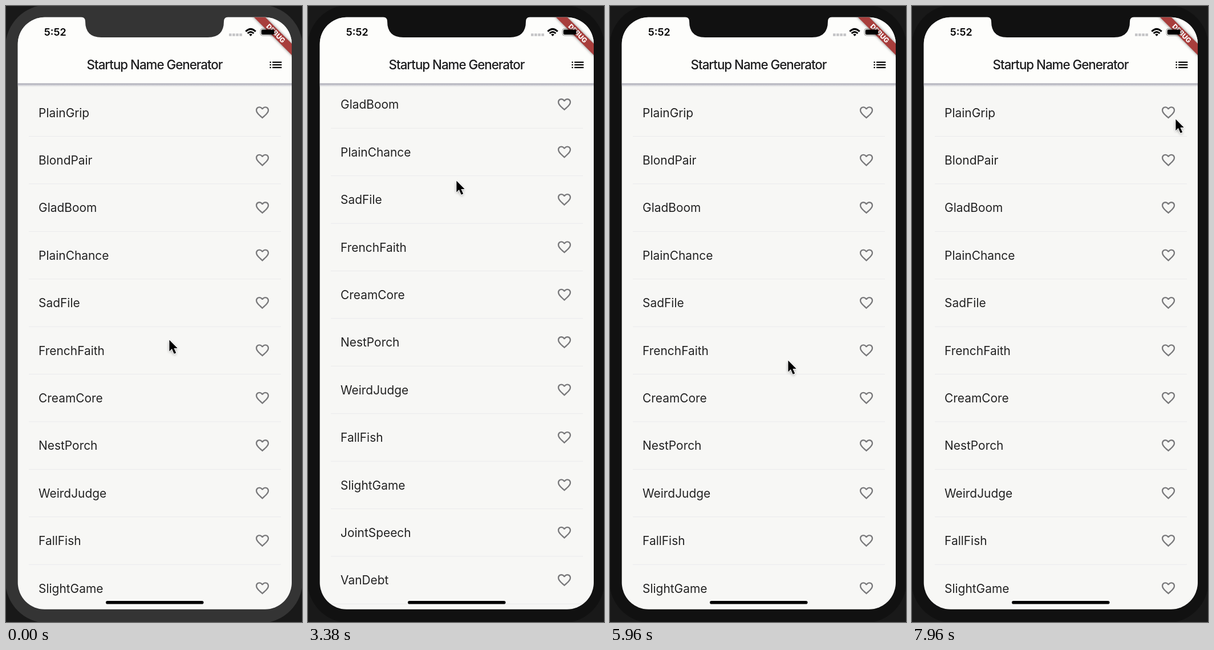
Write an HTML page that moves like this. It is 519x1080 px and loops after 8 s.

```html
<!DOCTYPE html>
<html lang="en">
<head>
<meta charset="utf-8">
<title>Name list</title>
<style>
  html, body { margin: 0; width: 100%; height: 100%; overflow: hidden; background: #191919; }
  svg { display: block; width: 100vw; height: 100vh; }
  text { font-family: Inter, Roboto, sans-serif; font-optical-sizing: none; }
</style>
</head>
<body>
<svg viewBox="0 0 519 1080">
  <defs>
    <clipPath id="screen"><rect x="20.7" y="19.8" width="480.3" height="1038" rx="47"/></clipPath>
    <linearGradient id="shade" x2="0" y2="1">
      <stop offset="0" stop-color="#a4a4ae"/>
      <stop offset=".4" stop-color="#c4c4cc"/>
      <stop offset="1" stop-color="#f7f7f5" stop-opacity="0"/>
    </linearGradient>
    <filter id="soft" x="-50%" y="-50%" width="200%" height="200%"><feGaussianBlur stdDeviation="2.5"/></filter>
    <path id="heart" transform="scale(1.159)" fill="#79797b" d="M16.5 3c-1.74 0-3.41.81-4.5 2.09C10.91 3.81 9.24 3 7.5 3 4.42 3 2 5.42 2 8.5c0 3.78 3.4 6.86 8.55 11.54L12 21.35l1.45-1.32C18.6 15.36 22 12.28 22 8.5 22 5.42 19.58 3 16.5 3zm-4.4 15.55l-.1.1-.1-.1C7.14 14.24 4 11.39 4 8.5 4 6.5 5.5 5 7.5 5c1.54 0 3.04.99 3.57 2.36h1.87C13.46 5.99 14.96 5 16.5 5c2 0 3.5 1.5 3.5 3.5 0 2.89-3.14 5.74-7.9 10.05z"/>
    <path id="arrow" d="M.4 .4V20.4L4.9 16.1L8.7 24.8L12.2 23.3L8.4 14.9H14.7Z"/>
  </defs>

  <rect id="body" x="-1" y="-2" width="521" height="1084" rx="74"/>
  <g clip-path="url(#screen)">
    <rect width="519" height="1080" fill="#f7f7f5"/>
    <g id="list"></g>
    <rect x="20" y="135" width="482" height="8" fill="url(#shade)"/>
    <rect x="20" y="19" width="482" height="116.5" fill="#fdfdfb"/>
    <text x="141.6" y="111.3" font-size="22.3" font-weight="500" letter-spacing="-1" fill="#1c1c1e">Startup Name Generator</text>
    <path transform="translate(459 89.3) scale(1.159)" d="M3 13h2v-2H3zm0 4h2v-2H3zm0-8h2V7H3zm4 4h14v-2H7zm0 4h14v-2H7zM7 7v2h14V7z"/>
    <g transform="translate(473 48) rotate(45)">
      <rect x="-70" y="-7" width="140" height="14" filter="url(#soft)" opacity=".5"/>
      <rect x="-70" y="-7" width="140" height="14" fill="#a83e3c"/>
      <text y="4.2" font-size="11.8" font-weight="800" text-anchor="middle" fill="#fff">DEBUG</text>
    </g>
  </g>
  <path id="notch" d="M132 19Q139 20 139 27Q139 55 167 55H354Q382 55 382 27Q382 20 389 19Z"/>

  <text x="66.8" y="52.4" font-size="17.9" font-weight="600">5:52</text>
  <path d="M391 50.5H414" stroke="#c4c4c6" stroke-width="4.4" stroke-dasharray="4.6 1.5"/>
  <g fill="none" stroke="#000" stroke-width="2.9">
    <path d="M420.3 44.6Q429 36.2 437.7 44.6M423.6 48Q429 43.2 434.4 48"/>
    <path d="M426.2 49.9Q429 47.8 431.8 49.9L429 52.9Z" fill="#000" stroke="none"/>
  </g>
  <rect x="446" y="39.5" width="26" height="12.5" rx="3.8" fill="none" stroke="#000" stroke-opacity=".4"/>
  <rect x="447.7" y="41.2" width="22.6" height="9.1" rx="2.2"/>
  <path d="M473.6 43.7q2 2 0 4.2z" opacity=".45"/>
  <rect x="175" y="1042.9" width="171.5" height="5.6" rx="2.8"/>

  <g id="cursor">
    <use href="#arrow" y="2" filter="url(#soft)" opacity=".45"/>
    <use href="#arrow" stroke="#fff" stroke-width="2" stroke-linejoin="round"/>
    <use href="#arrow"/>
  </g>
</svg>
<script>
const $ = id => document.getElementById(id);
const LOOP = 8000, PITCH = 83.4;
const names = ['PlainGrip', 'BlondPair', 'GladBoom', 'PlainChance', 'SadFile', 'FrenchFaith', 'CreamCore',
  'NestPorch', 'WeirdJudge', 'FallFish', 'SlightGame', 'JointSpeech', 'VanDebt'];

$('list').innerHTML = names.map((name, i) => `<g transform="translate(0 ${i * PITCH})">
  <text x="57.1" y="194.6" font-size="20.9" fill="#222">${name}</text>
  <use href="#heart" x="435.6" y="172.8"/>
  <path d="M40 228.5H482" stroke="#eaeaec"/></g>`).join('');

// Pointer path: time, x, y
const path = [[0, 286, 585], [500, 286, 585], [1750, 294, 404], [1900, 294, 404], [3200, 260, 306], [3400, 260, 306],
  [4750, 302, 584], [5000, 302, 584], [5700, 312, 621], [6000, 312, 621], [6700, 407, 610], [6950, 407, 610],
  [7850, 462, 198], [LOOP, 462, 198]];

const ease = p => p * p * (3 - 2 * p);

function pointer(t) {
  const i = path.findIndex(k => k[0] > t);
  const [t0, x0, y0] = path[i - 1], [t1, x1, y1] = path[i];
  const p = ease((t - t0) / (t1 - t0));
  return [x0 + (x1 - x0) * p, y0 + (y1 - y0) * p];
}

// The list follows the dragging pointer, with resistance past its top.
function scroll(t, y) {
  if (t < 1900) return y - 585;
  if (t < 3400) return -181;
  if (t < 5000) {
    const s = y - 487;
    return s > 0 ? s * .52 : s;
  }
  if (t < 5600) return 50.4 * (1 - ease((t - 5000) / 600));
  return 3.5 * Math.max(0, 1 - Math.abs(t - 6880) / 200);
}

function draw(now) {
  const t = now % LOOP, [x, y] = pointer(t);
  const shell = t < 40 ? '#343434' : '#111';
  $('body').setAttribute('fill', shell);
  $('notch').setAttribute('fill', shell);
  $('list').setAttribute('transform', `translate(0 ${scroll(t, y)})`);
  $('cursor').setAttribute('transform', `translate(${x} ${y})`);
  requestAnimationFrame(draw);
}
draw(0);
</script>
</body>
</html>
```
